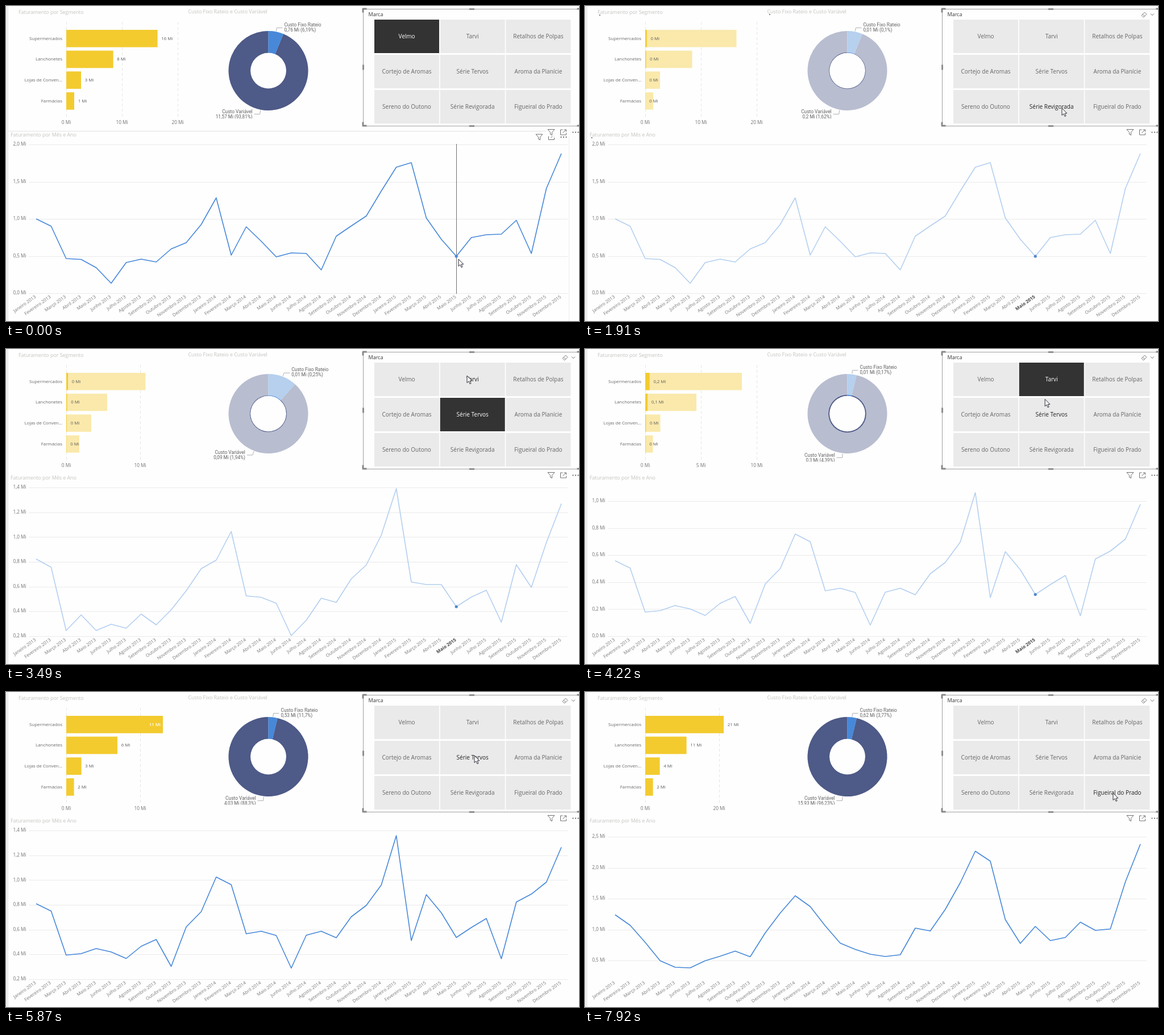
Recreate the animation shown at these times as an HTML page with a canvas. Size 1008 by 555 pixels, loop 7.99 s.

```html
<!DOCTYPE html>
<html lang="pt">
<head>
<meta charset="utf-8">
<title>Painel de faturamento</title>
<style>
html, body { margin: 0; width: 100%; height: 100%; overflow: hidden; background: #fefefe; }
canvas { display: block; width: 1008px; height: 555px; }
</style>
</head>
<body>
<canvas id="stage"></canvas>
<script>
const W = 1008, H = 555, LOOP = 7990;
const canvas = document.getElementById('stage');
const ctx = canvas.getContext('2d');
const dpr = window.devicePixelRatio || 1;
canvas.width = W * dpr;
canvas.height = H * dpr;

const SANS = '"Open Sans", "Noto Sans", sans-serif';
const LABEL = 'Roboto, "Noto Sans", sans-serif';
const YELLOW = '#f3cb2f', PALE_YELLOW = '#fae9ab';
const NAVY = '#4e5a87', PALE_NAVY = '#b8bdd0';
const BLUE = '#4788d9', PALE_BLUE = '#b4cff0';

const TILES = ['Velmo', 'Tarvi', 'Retalhos de Polpas', 'Cortejo de Aromas', 'Série Tervos',
  'Aroma da Planície', 'Sereno do Outono', 'Série Revigorada', 'Figueiral do Prado'];
const MONTHS = ['Janeiro', 'Fevereiro', 'Março', 'Abril', 'Maio', 'Junho', 'Julho',
  'Agosto', 'Setembro', 'Outubro', 'Novembro', 'Dezembro'];
const STORES = ['Supermercados', 'Lanchonetes', 'Lojas de Conven...', 'Farmácias'];
const ZERO = ['0 Mi', '0 Mi', '0 Mi', '0 Mi'];
const PICK = 28;

// axis: first tick value, its y, value step, y step, tick count
// part: share of the marked month; fixed: share of the fixed cost
const A = {
  axis: [0, 506, .5, 65.5, 5], ticks: [[106, '0 Mi'], [204, '10 Mi'], [302, '20 Mi']],
  rows: STORES, bars: [160.5, 82.5, 26, 14], vals: ['16 Mi', '8 Mi', '3 Mi', '1 Mi'], low: ZERO,
  fixed: .0619, part: .0172,
  cost: ['0,76 Mi (6,19%)', '11,57 Mi (93,81%)'], lowCost: ['0,01 Mi (0,1%)', '0,2 Mi (1,62%)'],
  line: [375, 388, 445, 446.5, 461, 488.5, 452, 446, 451, 428, 417, 385, 338, 439, 389, 414.5, 442, 435,
    436, 465, 405.5, 387.5, 370, 326, 284, 276, 373.5, 411, 441, 408, 403, 402, 377.5, 436, 321.5, 260]
};
const B = {
  axis: [.5, 467, .5, 65.5, 4], ticks: A.ticks,
  rows: [STORES[0], STORES[1], STORES[3], STORES[2]], bars: [154, 79.5, 43.5, 35],
  vals: ['16 Mi', '8 Mi', '4 Mi', '4 Mi'], low: ZERO,
  fixed: .0545, part: .029,
  cost: ['0,77 Mi (5,45%)', '13,4 Mi (94,55%)'], lowCost: ['0,02 Mi (0,15%)', '0,39 Mi (2,75%)'],
  line: [405, 389, 443, 484, 481, 488.5, 478, 465.5, 446.5, 473, 426, 391, 360.5, 380, 419.5, 446.5, 444, 472,
    462, 471, 418.5, 428.5, 385, 337, 246, 326, 388, 456.5, 417, 451.5, 417, 414, 415, 434, 337, 273.5]
};
const C = {
  axis: [.2, 506, .2, 43.65, 7], ticks: [[106, '0 Mi'], [236, '10 Mi']],
  rows: STORES, bars: [139.5, 72, 44, 23], vals: ['11 Mi', '6 Mi', '3 Mi', '2 Mi'], low: ZERO,
  fixed: .117, part: .0219,
  cost: ['0,53 Mi (11,7%)', '4,03 Mi (88,3%)'], lowCost: ['0,01 Mi (0,25%)', '0,09 Mi (1,94%)'],
  line: [370, 384.5, 496, 468.5, 496, 485, 492, 467, 486, 459.5, 426, 387, 372, 321.5, 435, 437.5, 448, 505,
    478, 439, 446.5, 405, 380.5, 328, 246, 410.5, 415, 415, 454, 437, 425, 481.5, 380, 420, 341, 272.5]
};
const D = {
  axis: [0, 506, .2, 47.6, 6], ticks: [[106, '0 Mi'], [204, '5 Mi'], [302, '10 Mi']],
  rows: STORES, bars: [170, 90, 26.5, 13.5], vals: ['8,7 Mi', '4,6 Mi', '1,4 Mi', '0,7 Mi'],
  low: ['0,2 Mi', '0,1 Mi', '0 Mi', '0 Mi'],
  fixed: .037, part: .0456,
  cost: ['0,25 Mi (3,7%)', '6,58 Mi (96,3%)'], lowCost: ['0,01 Mi (0,17%)', '0,3 Mi (4,39%)'],
  line: [373, 386, 463.5, 461, 452, 458, 469.5, 448, 436, 483.5, 414, 387, 326, 339.5, 426, 421.5, 429, 486.5,
    428.5, 421.5, 433, 396, 376, 340, 253, 438, 357, 389, 432.5, 415, 399, 470, 370, 356, 335, 273.5]
};
const E = {
  axis: [.5, 473, .5, 54.5, 5], ticks: [[106, '0 Mi'], [236, '20 Mi']],
  rows: STORES, bars: [138, 72.5, 25.5, 13.5], vals: ['21 Mi', '11 Mi', '4 Mi', '2 Mi'], low: ZERO,
  fixed: .0377, part: .029,
  cost: ['0,62 Mi (3,77%)', '15,93 Mi (96,23%)'], lowCost: ['0,02 Mi (0,12%)', '0,46 Mi (2,78%)'],
  line: [392.5, 411, 441, 473.5, 485, 486, 473.5, 465.5, 456.5, 466.5, 424.5, 389.5, 359, 378, 412, 442.5, 453.5, 462,
    466, 463, 416, 421, 383, 336, 280.5, 298, 401, 443, 413, 438, 432.5, 405.5, 420, 417.5, 334.5, 268]
};

// click time, tile, data, start and length of the chart change
const STEPS = [
  { click: 0, tile: 0, data: A, start: 0, len: 1 },
  { click: 1880, tile: 7, data: B, start: 1980, len: 380 },
  { click: 2800, tile: 4, data: C, start: 2910, len: 380 },
  { click: 3600, tile: 1, data: D, start: 3730, len: 400 },
  { click: 5640, tile: 4, data: C, start: 5860, len: 480 },
  { click: 6600, tile: 7, data: B, start: 6740, len: 460 },
  { click: 7610, tile: 8, data: E, start: 7680, len: 235 }
];
const MARK = 860, UNMARK = 4620, FADE = 700;
const PATH = [[0, 796, 446], [60, 796, 446], [70, 795, 445], [330, 795, 445], [400, 793, 444], [590, 793, 444],
  [660, 791, 436], [860, 791, 436], [1120, 801, 418], [1640, 801, 418], [1850, 839, 180], [2440, 839, 180],
  [2760, 822, 112], [3100, 822, 112], [3420, 811, 47], [4150, 811, 47], [4500, 794, 435], [5200, 794, 435],
  [5560, 824, 112], [6520, 824, 112], [6660, 848, 194], [7150, 848, 194], [7330, 929, 178], [LOOP, 929, 178]];

const clamp = v => Math.max(0, Math.min(1, v));
const mix = (a, b, k) => a + (b - a) * k;
const ease = k => k < .5 ? 4 * k ** 3 : 1 - 4 * (1 - k) ** 3;

function text(s, x, y, size, color, align = 'left', family = SANS, weight = 400) {
  ctx.font = `${weight} ${size}px ${family}`;
  ctx.textAlign = align;
  ctx.textBaseline = 'middle';
  ctx.fillStyle = color;
  ctx.fillText(s, x, y);
}

function rect(x, y, w, h, color) {
  ctx.fillStyle = color;
  ctx.fillRect(x, y, w, h);
}

function poly(points, color, width = 1) {
  ctx.beginPath();
  points.forEach(([x, y]) => ctx.lineTo(x, y));
  ctx.strokeStyle = color;
  ctx.lineWidth = width;
  ctx.stroke();
}

function disc(x, y, r, color) {
  ctx.beginPath();
  ctx.arc(x, y, r, 0, 7);
  ctx.fillStyle = color;
  ctx.fill();
}

function pointer(t) {
  const i = Math.max(1, PATH.findIndex(p => p[0] > t));
  const [t0, x0, y0] = PATH[i - 1], [t1, x1, y1] = PATH[i];
  const k = clamp((t - t0) / (t1 - t0)), s = k * k * (3 - 2 * k);
  return [mix(x0, x1, s), mix(y0, y1, s)];
}

function stateAt(t) {
  const last = key => STEPS.reduce((n, s, i) => s[key] <= t ? i : n, 0);
  const n = last('start'), step = STEPS[n], prev = STEPS[Math.max(0, n - 1)].data;
  const k = ease(clamp((t - step.start) / step.len));
  const d = step.data, between = key => mix(prev[key], d[key], k);
  const marked = t >= MARK && t < UNMARK;
  let share = 1;
  if (marked) share = mix(1, between('part'), ease(clamp((t - MARK) / FADE)));
  else if (t >= UNMARK) share = mix(D.part, 1, ease(clamp((t - UNMARK) / FADE)));
  const slicer = t < MARK || (t >= STEPS[1].click && t < UNMARK) || t >= STEPS[4].click;
  return {
    t, d, marked, share, slicer,
    tile: STEPS[last('click')].tile,
    loading: last('click') > n,
    fixed: between('fixed'),
    bars: d.bars.map((b, i) => mix(prev.bars[i], b, k)),
    line: d.line.map((y, i) => mix(prev.line[i], y, k)),
    mouse: pointer(t)
  };
}

function drawBars(s) {
  ctx.setLineDash([5, 4]);
  s.d.ticks.forEach(([x, label]) => {
    poly([[x + .5, 28], [x + .5, 198]], '#e6e6e6');
    text(label, x, 206, 8.3, '#707070', 'center');
  });
  ctx.setLineDash([]);
  s.bars.forEach((w, i) => {
    const y = 42 + i * 36.7, mid = y + 15.5;
    const len = w * s.share;
    rect(106, y, w, 30.5, PALE_YELLOW);
    rect(106, y, len, 30.5, YELLOW);
    text(s.d.rows[i], 99, mid, 7.9, '#686868', 'right');
    const label = (s.marked ? s.d.low : s.d.vals)[i];
    if (!s.marked && w > 165) text(label, 102 + len, mid, 7.8, '#fff', 'right', SANS, 600);
    else text(label, 112.7 + len, mid, 7.8, '#5c5c5c');
  });
}

function ring(r, from, to, color) {
  const cx = 461.5, cy = 114, top = -Math.PI / 2;
  ctx.beginPath();
  ctx.arc(cx, cy, r, top + from, top + to);
  ctx.arc(cx, cy, 31.5, top + to, top + from, true);
  ctx.fillStyle = color;
  ctx.fill();
}

function drawDonut(s) {
  const cut = s.fixed * 2 * Math.PI, full = 2 * Math.PI;
  const inner = mix(31.5, 70, s.share);
  ring(70, cut, full, PALE_NAVY);
  ring(70, 0, cut, '#b6d0ee');
  ring(inner, cut, full, NAVY);
  ring(inner, 0, cut, BLUE);

  const sin = Math.sin(cut / 2), cos = Math.cos(cut / 2);
  const values = s.marked ? s.d.lowCost : s.d.cost;
  ctx.save();
  ctx.beginPath();
  ctx.rect(310, 20, 300, 178.5);
  ctx.clip();
  [1, -1].forEach((side, i) => {
    const ex = 461.5 + side * sin * 77, ey = 114 - side * cos * 77 + (i ? 1 : 0);
    poly([[461.5 + side * sin * 71, 114 - side * cos * 71], [ex, ey], [ex + side * 10, ey]], '#b0b0b0');
    const align = i ? 'right' : 'left', x = ex + side * 13, y = ey - (i ? 4 : 5.2);
    text(['Custo Fixo Rateio', 'Custo Variável'][i], x, y, 8.4, '#606060', align, LABEL);
    text(values[i], x, y + 9, 8.2, '#606060', align, LABEL);
  });
  ctx.restore();
}

function drawLine(s) {
  const [v0, y0, dv, dy, count] = s.d.axis;
  for (let i = 0; i < count; i++) {
    const y = y0 - i * dy;
    rect(40, Math.round(y), 948, 1, '#eaeaea');
    text((v0 + i * dv).toFixed(1).replace('.', ',') + ' Mi', 35.5, y, 8.2, '#707070', 'right');
  }
  const px = i => 53 + i * 26.4;
  s.line.forEach((_, i) => {
    const bold = s.marked && i === PICK;
    ctx.save();
    ctx.translate(px(i) - 1, 512);
    ctx.rotate(-35 * Math.PI / 180);
    text(`${MONTHS[i % 12]} ${2013 + Math.floor(i / 12)}`, 0, 0, 8, bold ? '#444' : '#777', 'right', SANS, bold ? 700 : 400);
    ctx.restore();
  });
  const hover = s.t < MARK;
  if (hover) rect(792, 243, 1, 264, '#707070');
  ctx.lineJoin = 'round';
  poly(s.line.map((y, i) => [px(i), y]), s.marked ? PALE_BLUE : BLUE, 1.6);
  if (hover || s.marked) disc(px(PICK), s.line[PICK], 2.6, s.marked ? '#5088cc' : BLUE);
}

function drawTiles(s) {
  text('Marca', 637.5, 15.5, 9, '#333');
  TILES.forEach((name, i) => {
    const x = 648 + (i % 3) * 115.7, y = 24 + Math.floor(i / 3) * 62;
    const [mx, my] = s.mouse;
    const over = mx > x && mx < x + 114 && my > y && my < y + 59;
    const dark = i === s.tile && !over;
    rect(x, y, 114, 59, dark ? '#333' : '#eaeaea');
    text(name, x + 57, y + 30, 10, dark ? '#fff' : over ? '#222' : '#666', 'center');
  });
}

function toolbar(x, y) {
  const c = '#707070';
  poly([[x - 6, y - 5], [x + 6, y - 5], [x + 1.5, y], [x + 1.5, y + 5], [x - 1.5, y + 3.5], [x - 1.5, y], [x - 6, y - 5]], c);
  const f = x + 21.5;
  poly([[f - 1, y - 4.5], [f - 5, y - 4.5], [f - 5, y + 4.5], [f + 5, y + 4.5], [f + 5, y + 1]], c);
  poly([[f - 1, y + 1], [f + 5, y - 4.5]], c);
  poly([[f + 1, y - 4.5], [f + 5, y - 4.5], [f + 5, y - 1]], c);
  for (let i = 0; i < 3; i++) rect(x + 37.5 + i * 4.5, y - 1, 2, 2, c);
}

function frame(x, y, w, h) {
  const c = '#a0a0a0';
  ctx.strokeStyle = c;
  ctx.lineWidth = 1;
  ctx.strokeRect(x + .5, y + .5, w, h);
  [[x, 1], [x + w, -1]].forEach(([cx, sx]) => [[y, 1], [y + h, -1]].forEach(([cy, sy]) => {
    poly([[cx + sx * 6.5, cy], [cx, cy], [cx, cy + sy * 6.5]], '#888', 3);
  }));
  [y, y + h].forEach(v => rect(x + w / 2 - 4.5, v - 1, 9, 3, '#909090'));
  [x, x + w].forEach(v => rect(v - 1, y + h / 2 - 4.5, 3, 9, '#909090'));
}

function drawChrome(s) {
  const first = s.t < MARK;
  text('Faturamento por Segmento', 22, 11.5, 8.9, '#c4c3bf');
  text('Custo Fixo Rateio e Custo Variável', 320.5, 10.5, 8.9, '#c4c3bf');
  if (first) {
    rect(4, 220, 987, 1, '#e2e2e2');
    rect(990, 220, 1, 335, '#ededed');
  }
  if (s.slicer) frame(628, 5, 383, 206);
  else frame(4, 221, 987, 334);
  text('Faturamento por Mês e Ano', 8, 227.5, 8.9, '#c4c3bf');
  if (first || !s.slicer) toolbar(938, 231);
  if (s.slicer) {
    if (first) rect(950, 214, 58, 15.5, '#fefefe');
    toolbar(959, 222.5);
  }
  if (!first) poly([[995, 13.5], [998, 16.5], [1001, 13.5]], '#707070');
  if (!first && s.slicer) {
    poly([[979, 16.5], [984.5, 11], [988, 14.5], [982.5, 20], [979, 16.5]], '#777');
    poly([[981, 14.5], [984.5, 18]], '#777');
  }
  if (s.loading) [[26, 16], [325, 15], [12, 232]].forEach(([x, y]) => disc(x, y, 1, '#555'));
}

function drawMouse([x, y]) {
  ctx.beginPath();
  [[0, 0], [0, 12.5], [2.9, 9.8], [5, 14.5], [7, 13.6], [5, 9.1], [8.8, 9]]
    .forEach(([dx, dy]) => ctx.lineTo(x + dx, y + dy));
  ctx.closePath();
  ctx.fillStyle = '#fff';
  ctx.fill();
  ctx.strokeStyle = '#2a2a35';
  ctx.lineWidth = 1;
  ctx.stroke();
}

function draw(t) {
  const s = stateAt(t);
  ctx.setTransform(dpr, 0, 0, dpr, 0, 0);
  rect(0, 0, W, H, '#fefefe');
  rect(0, 0, 3, H, '#f1f1f1');
  rect(3, 0, 1, H, '#e4e4e4');
  drawBars(s);
  drawDonut(s);
  drawTiles(s);
  drawChrome(s);
  drawLine(s);
  drawMouse(s.mouse);
}

const begin = performance.now();
function tick() {
  draw((performance.now() - begin) % LOOP);
  requestAnimationFrame(tick);
}
tick();
</script>
</body>
</html>
```
